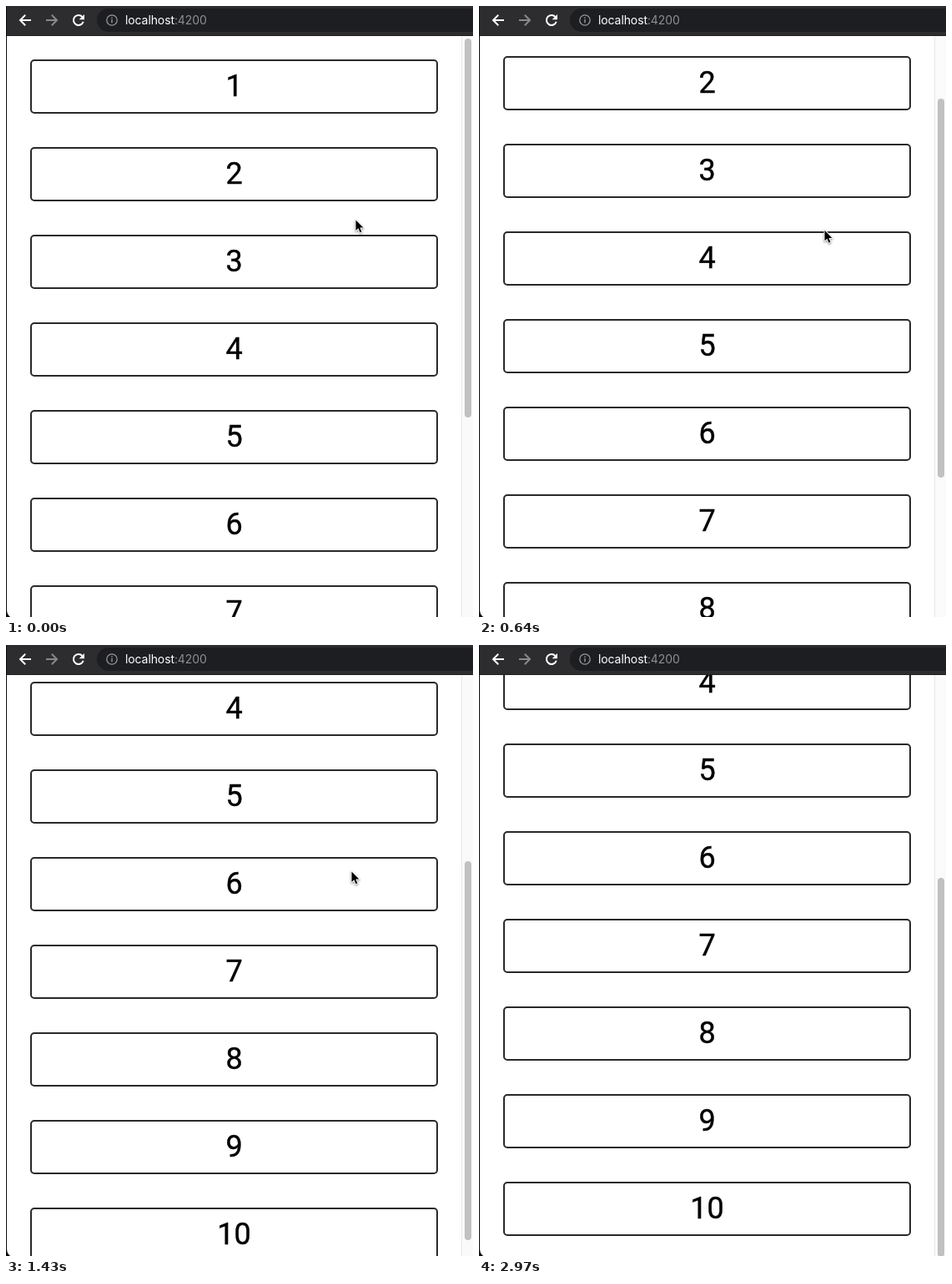
Animation, 560 px wide and 732 px high, one loop 3150 ms. Source, as an HTML page:

```html
<!DOCTYPE html>
<html lang="en">
<head>
<meta charset="utf-8">
<title>Scrolling list</title>
<style>
  html, body { margin: 0; width: 100%; height: 100%; overflow: hidden; background: #0b0b14; }
  #page { position: absolute; left: 1px; top: 36px; width: 559px; height: 698px; overflow: hidden;
    background: #fff; border-radius: 0 0 0 10px; }
  #list { position: absolute; left: 28px; top: 28px; width: 489px; will-change: transform; }
  .item { box-sizing: border-box; height: 65px; margin-bottom: 40px; border: 2px solid #29292b; border-radius: 5px;
    font: 36px/61px Roboto, sans-serif; text-align: center; color: #000; -webkit-text-stroke: .4px #000; }
  #track { position: absolute; left: 545px; top: 0; width: 13px; height: 100%; background: #fafafa;
    border-left: 1px solid #e8e8e8; }
  #thumb { position: absolute; left: 3px; top: 3px; width: 8px; height: 454px; border-radius: 4px; background: #c1c1c1; }
  svg { position: absolute; left: 0; top: 0; }
  #bar text { font: 14px Inter, sans-serif; letter-spacing: -.1px; }
</style>
</head>
<body>
<div id="page">
  <div id="list"></div>
  <div id="track"><div id="thumb"></div></div>
</div>
<svg id="bar" width="560" height="36" fill="none" stroke-width="2">
  <path d="M1 0H560V36H1z" fill="#2d2d2f"/>
  <path d="M1 35.5H560" stroke="#202022" stroke-width="1"/>
  <rect x="109" y="3" width="480" height="28" rx="14" fill="#1d1e21"/>
  <path d="M30 17H17.5M23.2 10.8L17 17l6.2 6.2" stroke="#fff"/>
  <path d="M48 17H60.500M54.800 10.800L61 17l-6.200 6.200" stroke="#88898b"/>
  <path d="M91.500 13A6 6 0 1 0 92.700 18.800" stroke="#fff"/>
  <path d="M94 10v6.300h-6.300z" fill="#fff"/>
  <circle cx="127" cy="17" r="6.200" stroke="#98999c" stroke-width="1.300"/>
  <path d="M127 16v4.300M127 13.500v1.500" stroke="#98999c" stroke-width="1.400"/>
  <text x="143" y="22" fill="#fff">localhost<tspan fill="#8e8f92">:4200</tspan></text>
</svg>
<svg width="560" height="732">
  <path id="cursor" d="M0 0V12.500L2.900 9.800 5 14.800 7 14 4.900 9.100H9z" fill="#000" stroke="#fff" stroke-width="2"
    stroke-linejoin="round" paint-order="stroke" style="filter: drop-shadow(0 1px 1px #0007)"/>
</svg>
<script>
const LOOP = 3150, THUMB_RATIO = 0.656;
const $ = id => document.getElementById(id);

for (let i = 1; i <= 10; i++) {
  const item = document.createElement('div');
  item.className = 'item';
  item.textContent = i;
  $('list').append(item);
}

// Monotone cubic curve through [time, value] points, flat outside them.
function curve(points) {
  const last = points.length - 1;
  const slope = i => (points[i + 1][1] - points[i][1]) / (points[i + 1][0] - points[i][0]);
  const tangent = i => {
    if (i === 0 || i === last) return 0;
    const a = slope(i - 1), b = slope(i);
    return a * b > 0 ? 2 * a * b / (a + b) : 0;
  };
  return t => {
    if (t <= points[0][0]) return points[0][1];
    if (t >= points[last][0]) return points[last][1];
    const i = points.findIndex(p => p[0] > t) - 1;
    const [t0, v0] = points[i], [t1, v1] = points[i + 1];
    const span = t1 - t0, u = (t - t0) / span;
    return v0 + (v1 - v0) * u * u * (3 - 2 * u)
      + span * u * (1 - u) * (tangent(i) * (1 - u) - tangent(i + 1) * u);
  };
}

const scroll = curve([
  [15, 0], [150, 6], [255, 21], [330, 55], [420, 92], [520, 108],
  [620, 108], [650, 110], [730, 136], [820, 186], [900, 220], [1000, 239],
  [1165, 239], [1250, 260], [1340, 299], [1435, 336], [1550, 366]
]);
const cursorX = curve([[280, 419.5], [510, 414.5], [1940, 414.5], [2030, 437], [2140, 495], [2280, 564]]);
const cursorY = curve([[280, 256.5], [510, 267], [650, 269], [720, 271.5], [1940, 271.5], [2030, 232], [2140, 118], [2280, 4]]);

function draw(now) {
  const t = now % LOOP, y = Math.round(scroll(t));
  $('list').style.transform = `translateY(${-y}px)`;
  $('thumb').style.transform = `translateY(${Math.round(y * THUMB_RATIO)}px)`;
  $('cursor').setAttribute('transform', `translate(${cursorX(t)} ${cursorY(t)})`);
  $('cursor').style.visibility = t < 2280 ? 'visible' : 'hidden';
}

const start = performance.now();
function tick() {
  draw(performance.now() - start);
  requestAnimationFrame(tick);
}
tick();
</script>
</body>
</html>
```
